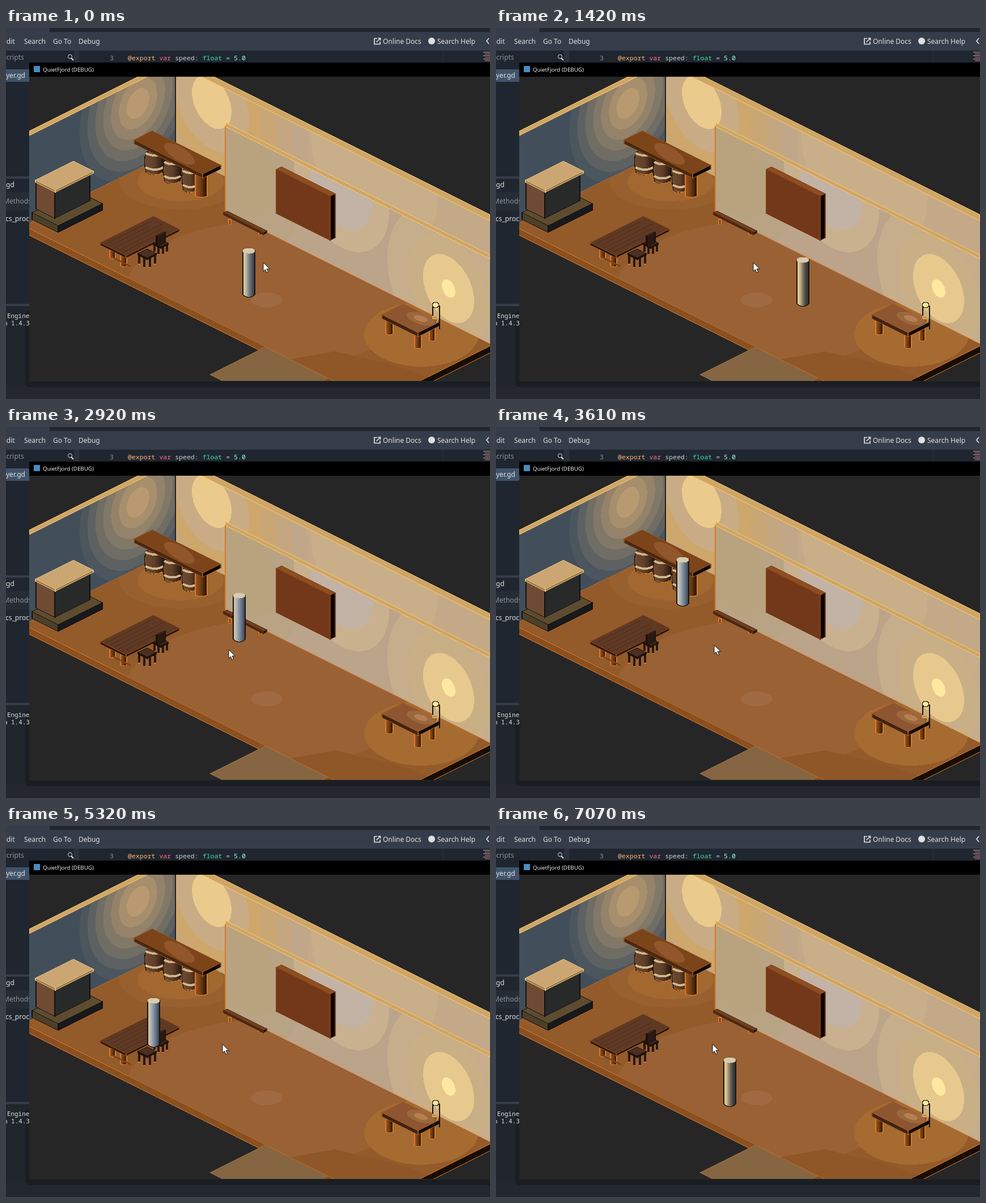
An HTML page for the animation above (7090 ms loop, 854x655 px).

```html
<!DOCTYPE html>
<html lang="en">
<head>
<meta charset="utf-8">
<title>Isometric room</title>
<style>
html, body { margin: 0; width: 100%; height: 100%; overflow: hidden; background: #24282e; }
svg { display: block; width: 854px; height: 655px; }
text { font: 12px "Noto Sans", "Open Sans", sans-serif; fill: #e0e0e0; white-space: pre; }
.dim { fill: #8d939c; }
.title { font: 9.8px "Open Sans", sans-serif; fill: #fff; }
.code { font: 11.56px "Noto Sans Mono", "DejaVu Sans Mono", monospace; }
.log { font: 10.9px "Noto Sans Mono", "DejaVu Sans Mono", monospace; }
#room { shape-rendering: crispEdges; }
</style>
</head>
<body>
<svg id="stage" viewBox="0 0 854 655"></svg>
<script>
const ORANGE = '#d8782e', GOLD = '#ffc564', DARK = '#1d120b', CREAM = '#cda668', LIGHT = '#e0e0e0';
const range = n => [...Array(n).keys()];
const lerp = (a, b, k) => a + (b - a) * k;
const clamp = (v, lo, hi) => Math.min(hi, Math.max(lo, v));

function mix(a, b, k) {
  const part = (c, i) => parseInt(c.slice(1 + 2 * i, 3 + 2 * i), 16);
  return `rgb(${range(3).map(i => Math.round(lerp(part(a, i), part(b, i), k)))})`;
}

const rect = (x, y, w, h, fill) => `<rect x="${x}" y="${y}" width="${w}" height="${h}" fill="${fill}"/>`;
const oval = (x, y, rx, ry, fill, stroke = 'none') =>
  `<ellipse cx="${x}" cy="${y}" rx="${rx}" ry="${ry}" fill="${fill}" stroke="${stroke}"/>`;
const path = (d, fill, stroke = 'none', w = 1.2) =>
  `<path d="${d}" fill="${fill}" stroke="${stroke}" stroke-width="${w}"/>`;
const line = (d, stroke, w) => path(d, 'none', stroke, w);
const text = (x, y, s, kind = '') => `<text x="${x}" y="${y}" class="${kind}">${s}</text>`;
const clip = (id, d, body) =>
  `<clipPath id="${id}"><path d="${d}"/></clipPath><g clip-path="url(#${id})">${body}</g>`;
const ramp = (id, colors) => `<linearGradient id="${id}">` + colors.map((c, i) =>
  `<stop offset="${i / (colors.length - 1)}" stop-color="${c}"/>`).join('') + '</linearGradient>';

// Isometric faces; (x, y) is the front corner, a runs to the left corner and b to the right one.
const slant = (x, y, dx, slope, h) => `M${x} ${y}l${dx} ${dx * slope}v${h}l${-dx} ${-dx * slope}z`;
const topFace = (x, y, a, b) => `M${x} ${y}l${-a} ${-a / 2}l${b} ${-b / 2}l${a} ${a / 2}z`;
const box = (x, y, a, b, h, top, left, right = '#0d0906', edge = 'none') =>
  path(slant(x, y, -a, .5, h), left, edge) + path(slant(x, y, b, -.5, h), right, edge) +
  path(topFace(x, y, a, b), top, edge);

// Pool of light in n bands, from radius r0 inward to r1.
const glow = (x, y, slope, r0, r1, n, c0, c1, tall = 1.26) =>
  `<g transform="matrix(1 ${slope} 0 1 ${x} ${y})">` + range(n).map(i => {
    const k = n > 1 ? i / (n - 1) : 0, r = lerp(r0, r1, k);
    return oval(0, 0, r, r * tall, mix(c0, c1, k));
  }).join('') + '</g>';

function wall(id, x, y, w, slope, h, cap, fill, lights) {
  const d = slant(x, y, w, slope, h);
  return clip(id, d, path(d, fill) + lights) + path(slant(x, y - cap, w, slope, cap), CREAM, GOLD);
}

function editor() {
  const panel = '#1f262f', bar = '#363d4a';
  const code = Object.entries({ '@export': '#ffb373', ' var': '#ff7085', ' speed': '#cdcfd2', ':': '#abc9ff',
    ' float': '#42d9b0', ' =': '#abc9ff', ' 5.0': '#a1ffe0' })
    .map(([s, c]) => `<tspan style="fill:${c}">${s}</tspan>`).join('');
  return rect(0, 0, 854, 40, bar) + rect(77, 0, 777, 7, '#21262e') +
    rect(0, 40, 854, 22, panel) + rect(120, 40, 9, 22, '#2b323d') + rect(771, 40, 1, 22, '#2b323c') +
    rect(0, 62, 42, 425, panel) + rect(0, 73, 42, 22, '#40536b') +
    rect(0, 262, 42, 4, bar) + rect(0, 290, 42, 32, '#262c36') +
    rect(0, 487, 42, 4, bar) + rect(0, 491, 42, 139, '#21262d') +
    path('M34 500H854V634H42Q34 634 34 626Z', '#1a1e23') +
    text(-6, 27.5, 'Edit') + text(32, 27.5, 'Search') + text(83, 27.5, 'Go To') +
    text(128, 27.5, 'Debug') + text(665, 27.5, 'Online Docs') + text(761, 27.5, 'Search Help') +
    line('M655 18.5H650V28.5H660V24M653.5 25L660 18.5M656.5 18H660.5V22M852 18L848 23L852 28', LIGHT, 1.7) +
    oval(751, 23, 6, 6, LIGHT) + oval(113, 50.5, 3.5, 3.5, 'none', LIGHT) + line('M115 53l4 4', LIGHT, 2) +
    range(6).map(i => rect(842 + i % 2 * 3, 42 + i * 3, 12, 1.5, i % 2 ? '#a95a6a' : '#8c8580')).join('') +
    text(-6, 56, 'Scripts', 'dim') + text(0, 88, 'yer.gd') + text(0, 281, 'gd') +
    text(-5, 310, 'Methods', 'dim') + text(-1, 341, 'cs_proc') +
    text(183, 57, '3', 'code dim') + text(215, 57, code, 'code') +
    text(2, 512, 'Engine', 'log') + text(-4, 525, 'n 1.4.3', 'log') +
    rect(41, 61, 813, 25, '#000') + rect(49, 67, 11, 11, '#478cbf') +
    text(65, 77, 'QuietFjord (DEBUG)', 'title') + rect(41, 86, 813, 538, '#262627');
}

function floor() {
  const size = [655, 661, 624, 268];
  return box(...size, 12, '#935a2a', '#8a501f', '#160d06', ORANGE) +
    clip('onFloor', topFace(...size), oval(470, 470, 262, 130, '#996134') +
      glow(308, 271, 0, 108, 76, 2, '#98602f', '#a2682f', .46) +
      path('M480 622L500 585L580 571L690 596L760 622Z', '#8f5628') +
      oval(733, 541, 101, 57, '#a56b31') + oval(460, 480, 28, 13, '#9f6a41')) +
    box(470, 667, 110, 97, 0, '#856542', 'none', 'none', '#a1713e');
}

function walls() {
  return wall('leftWall', 41, 190, 258, -.5, 154, 8, '#434e5b',
      glow(233, 133, -.5, 103, 20, 7, '#4b565e', '#b99a70')) +
    wall('backWall', 299, 63, 555, .5, 155, 11, '#c4a988',
      glow(650, 240, .5, 112, 112, 1, '#c9ae8a', '#c9ae8a') +
      glow(363, 131, .5, 170, 88, 4, '#c0a78a', '#cda76b') +
      glow(363, 131, .5, 66, 35, 2, '#c9ac85', '#ebca8d')) +
    line('M299 86v130', '#2a2019') +
    wall('frontWall', 387, 174, 467, .5, 150, 7, '#bca48b',
      glow(420, 255, .5, 100, 60, 2, '#b8a384', '#b9a37f') +
      glow(592, 282, .5, 84, 55, 2, '#c9b18f', '#c3b2a6') +
      glow(781, 460, .5, 108, 72, 2, '#c6ad8c', '#c9af86') +
      glow(781, 460, .5, 45, 12, 2, '#e8c98d', '#ffe89f')) +
    line('M387 173v151l467 233.5', ORANGE);
}

const leg = (x, y, w, h) =>
  path(`M${x} ${y}v${h - 2}q${w / 2} 4 ${w} 0v${2 - h}z`, 'url(#wood)', ORANGE);

function barrel(x, y, w, h) {
  const hoop = d => line(`M${x + 1} ${y + d}q${w / 2} 8 ${w - 2} 0`, '#d0b58a', 4);
  return path(`M${x + 2} ${y + 2}q${w / 2} -5 ${w - 4} 0q5 ${h / 2} 0 ${h - 5}q${-w / 2} 8 ${4 - w} 0` +
    `q-5 ${-h / 2} 0 ${5 - h}`, 'url(#barrel)', DARK) + hoop(4) + hoop(h - 12) +
    line(`M${x + 3} ${y + h - 3}q${w / 2} 8 ${w - 6} 0`, ORANGE);
}

function stool(x, y, size) {
  const legs = range(4).map(i => {
    const k = i / 3 * 2 - 1;
    return rect(x + k * size * .85 - 2, y - Math.abs(k) * size / 2, 4, size + 3, '#2a180e') +
      line(`M${x + k * size * .85 - 2} ${y + size + 3 - Math.abs(k) * size / 2}h4`, ORANGE);
  }).join('');
  return legs + box(x, y, size, size, 3, '#4c2f20', DARK, DARK, DARK);
}

function furniture() {
  const bar = range(3).map(i => barrel(245 + i * 33, 217 + i * 15.5, 34 - i * 3, 41)).join('') +
    leg(334, 255, 21, 44) + box(347, 258, 121, 32, 7, '#7c4419', '#4a2812', '#0b0705', '#93501f') +
    glow(306, 222, .5, 27, 27, 1, '#91562a', '#91562a', .5);
  const hearth = box(92, 349, 46, 78, 12, '#5d4c30', '#4c4029', '#17191c', '#15120d') +
    line('M42 342l50 20l78 -38', '#a75e28') +
    box(86, 289, 33, 62, 47, '#282929', '#6f4b34', '#282929', '#15110e') +
    box(87, 286, 35, 67, 4, '#cba672', '#9d7c4d', '#9d7c4d', '#e0ba78');
  const grain = range(5).map(i =>
    line(`M${204 - i * 7} ${397 - i * 4}l${70 + i % 3 * 8} ${-35 - i % 3 * 4}`, '#4c2c1b', 1)).join('');
  const table = leg(183, 388, 10, 20) + leg(202, 402, 11, 20) + line('M186 404l34 17', '#7a431c', 3) +
    box(212, 402, 46, 94, 4, '#5f3923', '#26150d', '#26150d', '#8c4a20') + grain +
    stool(273, 386, 13) + box(267, 368, 2, 14, 18, '#5a3722', '#5a3722', '#2a1a12', DARK) + stool(249, 406, 16);
  const bench = leg(393, 338, 4, 9) + leg(446, 360, 5, 6) +
    box(454, 361, 70, 6, 4, '#70401f', '#4a2611', DARK, '#562b13');
  const board = box(572, 297, 95, 9, 78, '#8f4e20', '#723819', '#050403', '#7d401b');
  const desk = leg(670, 514, 13, 28) + leg(747, 524, 10, 29) + leg(721, 538, 12, 28) +
    box(727, 538, 64, 38, 7, '#8e5630', '#3f2213', '#100a07', '#a0571f') +
    glow(732, 513, .25, 25, 12, 2, '#9d673d', '#b48051', .42);
  const lamp = line('M765 490v42M753 488v20', DARK, 2.5) + line('M763 493v19l-3 8', '#d2b86e', 1.5) +
    oval(758, 489, 6, 5, '#ffe9a1', DARK) + oval(757, 511, 5, 3, '#b9975d', '#e7bd68');
  return bar + hearth + table + bench + board + desk + lamp;
}

function pillar() {
  const body = 'M1 5V83Q11.5 92 22 83V5Z';
  return '<g id="pillar">' + path(body, 'url(#cool)', '#171512') +
    `<g id="warm">${path(body, 'url(#sunny)', '#171512')}</g>` +
    oval(11.5, 5.5, 10.5, 4.5, '#d0cbc0', '#f0c873') + '</g>';
}

const node = id => document.getElementById(id);
node('stage').innerHTML = '<defs>' +
  ramp('barrel', ['#6e4a31', '#604029', '#25170f']) +
  ramp('wood', ['#a0531d', '#6a3a10', '#1c0f07']) +
  ramp('cool', ['#e0ca92', '#b5b7b6', '#8290a2', '#5c6979', '#38424e']) +
  ramp('sunny', ['#f0d491', '#d0b989', '#7d7263', '#424140', '#303132']) + '</defs>' + editor() +
  `<g id="room">${clip('view', 'M41 86H854V623H41Z', floor() + walls() + furniture())}${pillar()}</g>` +
  '<g id="cursor">' + path('M0 0V15.5L3.5 12.3L6 18L8.6 16.9L6.1 11.3H11Z', '#fff', '#111', 1) + '</g>';

// Motion advances in even steps; each waypoint is step, x, y.
const LOOP = 7090, START = 323, STEP = 135.8;
const WALK = [[-1, 417, 388], [3, 467, 428], [5, 495, 442], [8, 530, 404], [13, 454, 350], [16, 449, 329],
  [24, 318, 229], [28, 250, 195], [31, 186, 261], [32, 212, 255], [40, 285, 351], [41, 309, 363], [48, 401, 408]];
const POINT = [[8, 454, 414], [13, 403, 403], [24, 385, 385], [31, 382, 385]];

function along(stops, step) {
  const i = stops.findIndex(s => s[0] >= step);
  if (i < 1) return stops.at(i);
  const a = stops[i - 1], b = stops[i], k = (step - a[0]) / (b[0] - a[0]);
  return a.map((v, j) => Math.round(lerp(v, b[j], k)));
}

function place(id, [, x, y]) {
  node(id).setAttribute('transform', `translate(${x} ${y})`);
}

function draw(t) {
  const step = Math.max(-1, Math.floor((t - START) / STEP));
  const spot = along(WALK, step);
  place('pillar', spot);
  place('cursor', along(POINT, step));
  node('warm').setAttribute('opacity', clamp((spot[2] - 375) / 30, 0, 1));
}

const start = performance.now();
function tick() {
  draw((performance.now() - start) % LOOP);
  requestAnimationFrame(tick);
}
tick();
</script>
</body>
</html>
```
